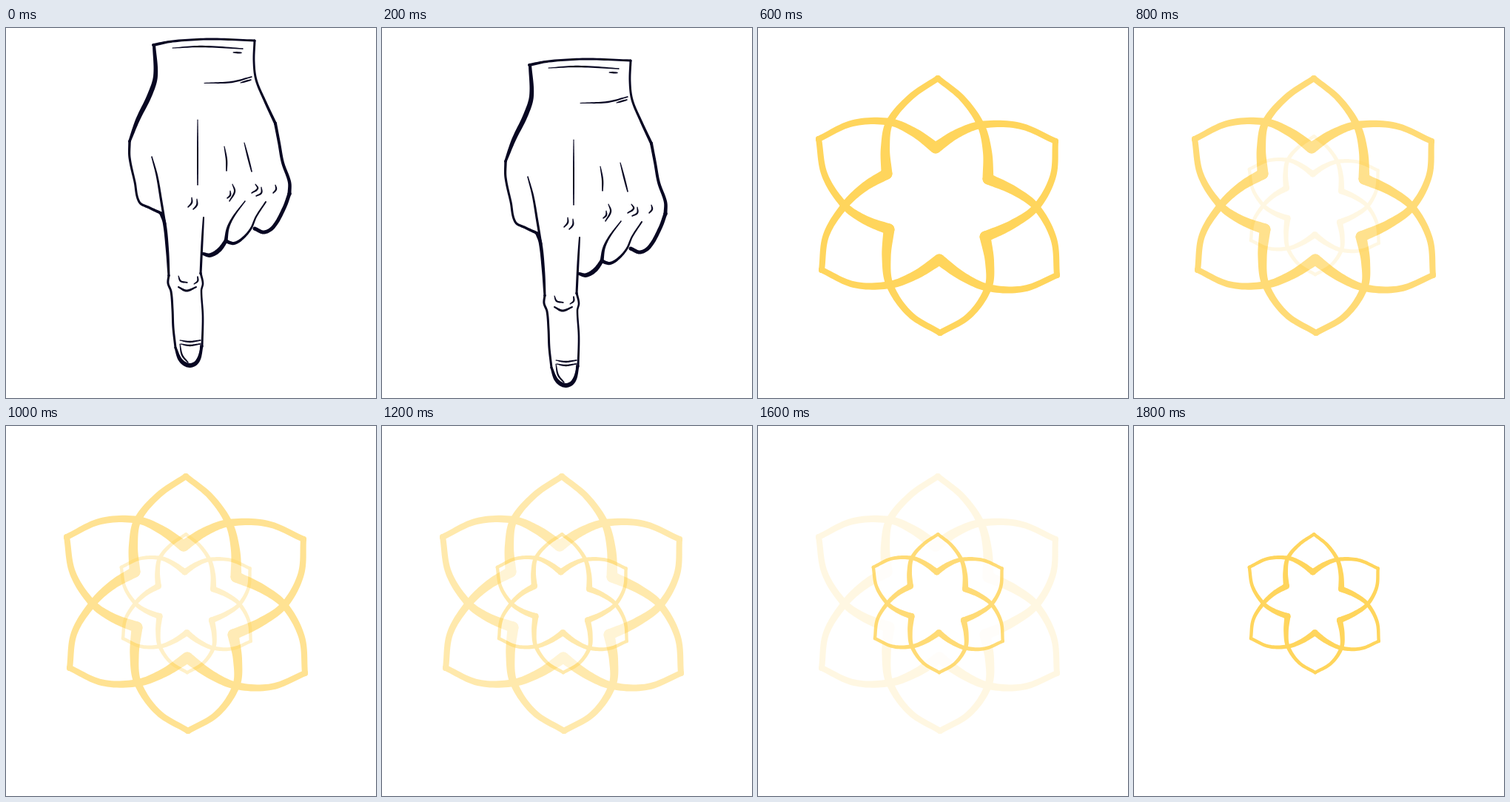
An HTML page with a canvas for the animation above (2 s loop, 500 by 500 pixels).

```html
<!DOCTYPE html>
<html lang="en">
<head>
<meta charset="utf-8">
<title>Pointing hand and flower</title>
<style>
  html, body { margin: 0; width: 100%; height: 100%; overflow: hidden; background: #fff; }
  canvas { display: block; width: 500px; height: 500px; }
</style>
</head>
<body>
<canvas id="stage" width="500" height="500"></canvas>
<script>
const SIZE = 500, STEP = 200, STEPS = 10, FADE_START = 3, HAND_DROP = 27;
const INK = '#080722', GOLD = '#ffd55c';
const ctx = document.getElementById('stage').getContext('2d');

// Smooth curve through the points; tangents scale with segment length.
function smooth(pts) {
  const last = pts.length - 1, out = [];
  const heading = i => {
    const [ax, ay] = pts[Math.max(i - 1, 0)], [bx, by] = pts[Math.min(i + 1, last)];
    const len = Math.hypot(bx - ax, by - ay);
    return [(bx - ax) / len, (by - ay) / len];
  };
  for (let i = 0; i < last; i++) {
    const a = pts[i], b = pts[i + 1], ha = heading(i), hb = heading(i + 1);
    const len = Math.hypot(b[0] - a[0], b[1] - a[1]);
    for (let n = 0; n < 12; n++) {
      const t = n / 12, s = 1 - t;
      out.push(a.map((v, k) => s * s * (1 + 2 * t) * v + t * t * (3 - 2 * t) * b[k] +
        len * t * s * (s * ha[k] - t * hb[k])));
    }
  }
  out.push(pts[last]);
  return out;
}

function fillPolygon(g, pts) {
  g.beginPath();
  pts.forEach(([x, y]) => g.lineTo(x, y));
  g.fill();
}

function dot(g, [x, y], width) {
  g.beginPath();
  g.arc(x, y, width / 2, 0, 2 * Math.PI);
  g.fill();
}

// Fills a stroke whose width runs from w0 through w1 to w2.
function brush(g, path, w0, w1, w2) {
  const left = [], right = [], last = path.length - 1;
  path.forEach(([x, y], i) => {
    const p = path[Math.max(i - 1, 0)], n = path[Math.min(i + 1, last)], u = i / last;
    const dx = n[0] - p[0], dy = n[1] - p[1];
    const width = w0 * (1 - u) * (1 - 2 * u) + 4 * w1 * u * (1 - u) + w2 * u * (2 * u - 1);
    const k = width / 2 / Math.hypot(dx, dy);
    left.push([x - dy * k, y + dx * k]);
    right.unshift([x + dy * k, y - dx * k]);
  });
  fillPolygon(g, left.concat(right));
  dot(g, path[0], w0);
  dot(g, path[last], w2);
}

function layer(paint) {
  const canvas = document.createElement('canvas');
  canvas.width = canvas.height = SIZE;
  paint(canvas.getContext('2d'));
  return canvas;
}

function paintHand(g) {
  g.fillStyle = INK;
  const pen = (w0, w1, w2, ...xy) => {
    const pts = [];
    for (let i = 0; i < xy.length; i += 2) pts.push([xy[i], xy[i + 1]]);
    brush(g, smooth(pts), w0, w1, w2);
  };
  const crease = (...xy) => pen(1, 2.3, 1.5, ...xy);

  // Wrist
  pen(4, 3, 3, 199, 23, 225, 18, 275, 15, 336, 17);
  crease(225, 27, 265, 25, 320, 28);
  crease(307, 33, 318, 33.5);
  crease(268, 74.5, 305, 73, 332, 66);
  crease(317, 74, 331, 70);

  // Back of the hand
  pen(4, 6.5, 3.5, 200, 23, 202, 65, 194, 91, 178, 124, 167, 153);
  pen(3.5, 3, 4, 167, 153, 167, 175, 174, 208, 180, 235, 194, 243, 209, 250);
  pen(4, 4.5, 3, 209, 250, 214, 263, 218, 300, 220, 335);
  pen(3, 3, 4, 336, 17, 335, 45, 338, 70, 350, 99, 364, 129);
  pen(4, 4, 5, 364, 129, 369, 155, 374, 182, 383, 208, 383, 224);
  pen(5, 5, 5, 383, 224, 376, 243, 362, 268, 349, 276, 336, 271);

  // Folded fingers
  pen(2, 3, 5, 351, 235, 338, 255, 331, 271, 320, 284, 308, 291, 297, 288);
  pen(1.5, 3, 5, 323, 234, 308, 254, 300, 270, 297, 288);
  pen(5, 6, 4, 297, 288, 288, 300, 276, 307, 266, 305);
  pen(2, 3, 3, 267, 256, 265, 290, 263, 332);

  // Index finger
  pen(3, 3, 3, 220, 334, 219, 345, 223, 356, 225, 380, 226, 405, 229, 432);
  pen(3, 6, 3, 229, 432, 236, 449, 248, 456, 259, 450, 265, 430);
  pen(3, 2.5, 3, 265, 430, 266, 390, 264, 355, 266, 345, 263, 331);
  crease(233, 335, 236, 342, 245, 344);
  crease(254, 346, 259, 342, 259, 336);
  pen(2, 3, 2, 233, 350, 244, 355, 257, 350);
  crease(235, 422, 248, 424, 263, 422);
  crease(236, 427, 248, 429, 262, 427);
  crease(235, 427, 238, 442, 246, 452);
  crease(263, 426, 262, 441, 257, 450);

  // Tendons and knuckles
  pen(1.5, 3, 3, 197, 174, 204, 200, 210, 235, 215, 265);
  pen(1, 2, 1.5, 259, 124, 259, 212);
  crease(295, 160, 298, 178, 298, 193);
  crease(322, 155, 332, 194);
  crease(251, 229, 251, 236, 246, 242);
  crease(258, 231, 258, 239, 253, 245);
  crease(306, 211, 309, 221, 302, 234);
  crease(303, 220, 303, 226, 299, 230);
  crease(337, 211, 340, 217, 332, 223);
  crease(345, 215, 345, 223, 338, 227);
  crease(364, 212, 365, 218, 361, 223);
}

// Clockwise from the top; crossing i follows tip i, notch i follows crossing i.
const tips = [[243, 68], [402, 153], [404, 334], [246, 412], [86, 327], [82, 150]];
const crossings = [[301, 131], [376, 242], [311, 351], [178, 347], [117, 240], [178, 127]];
const notches = [[240, 162], [311, 204], [307, 282], [245, 313], [177, 272], [174, 197]];

function bulge([ax, ay], [bx, by], amount) {
  const k = amount / Math.hypot(bx - ax, by - ay);
  return [(ax + bx) / 2 + (by - ay) * k, (ay + by) / 2 - (bx - ax) * k];
}

function petalSide(i, side) {
  const tip = tips[i];
  const cross = crossings[side > 0 ? i : (i + 5) % 6];
  const notch = notches[side > 0 ? (i + 1) % 6 : (i + 5) % 6];
  const outer = i === 0 ? 6 : 10;
  return smooth([tip, bulge(tip, cross, side * outer), cross, bulge(cross, notch, side * 4), notch]);
}

// Petals are opaque white inside, so a flower veils what lies below it.
function paintFlower(g) {
  const petals = tips.map((_, i) => [petalSide(i, -1), petalSide(i, 1)]);
  g.fillStyle = '#fff';
  petals.forEach(([a, b]) => fillPolygon(g, a.concat([...b].reverse())));
  g.fillStyle = GOLD;
  petals.flat().forEach(path => brush(g, path, 8, 10, 15));
}

const hand = layer(paintHand);
const bigFlower = layer(paintFlower);
const smallFlower = layer(g => {
  g.translate(111.2, 109.3);
  g.scale(0.5435, 0.5435);
  paintFlower(g);
});

function draw(now) {
  const step = Math.floor(now / STEP) % STEPS;
  ctx.globalAlpha = 1;
  ctx.fillStyle = '#fff';
  ctx.fillRect(0, 0, SIZE, SIZE);
  if (step < FADE_START) {
    ctx.drawImage(hand, 0, step === 1 ? HAND_DROP : 0);
  } else {
    const fade = (step - FADE_START) / (STEPS - 1 - FADE_START);
    ctx.globalAlpha = 1 - fade;
    ctx.drawImage(bigFlower, 0, 0);
    ctx.globalAlpha = fade;
    ctx.drawImage(smallFlower, 0, 0);
  }
}

const start = performance.now();
function tick() {
  draw(performance.now() - start);
  requestAnimationFrame(tick);
}
tick();
</script>
</body>
</html>
```
